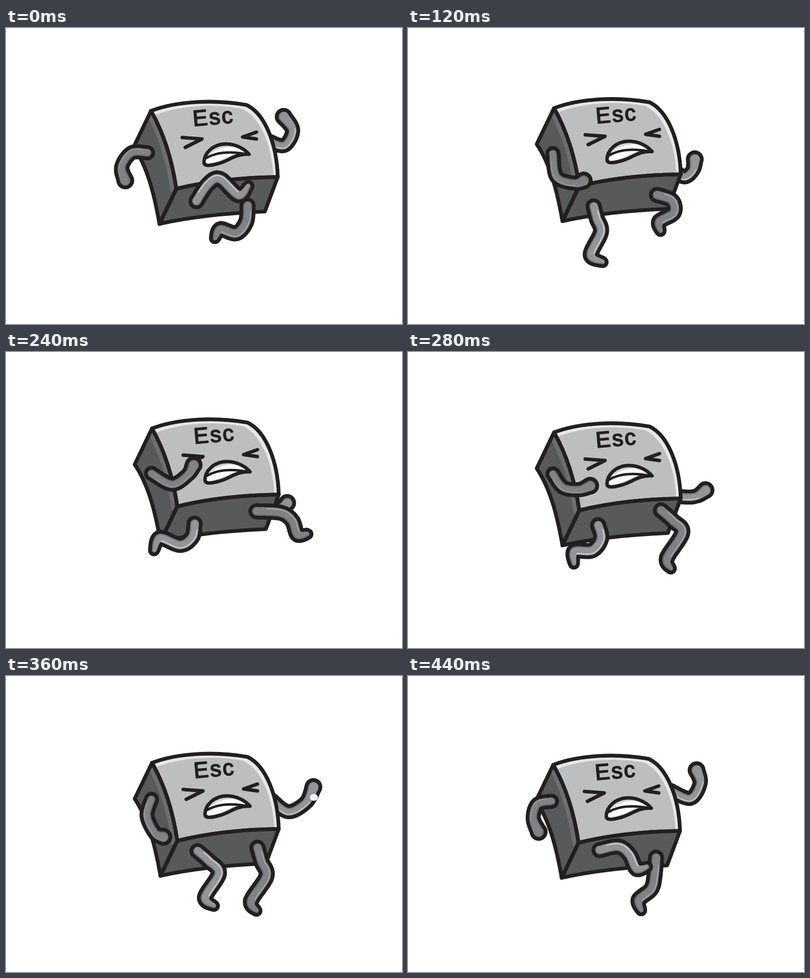
An HTML page with a canvas for the animation above (0.48 s loop, 800x600 px).

```html
<!DOCTYPE html>
<html lang="en">
<head>
<meta charset="utf-8">
<title>Running Esc key</title>
<style>
  html, body { margin: 0; width: 100%; height: 100%; overflow: hidden; background: #fff; }
  canvas { display: block; }
</style>
</head>
<body>
<canvas id="stage" width="800" height="600"></canvas>
<script>
const ctx = document.getElementById('stage').getContext('2d');
const STEPS = 12, STEP_MS = 40, INK = '#231f20', LINE = 7.6;

// Poses by step; each is a chain of x, y joints from the body outwards.
const bodyShift = {
  0: [-2, 9], 2: [0, 7], 4: [0, 0], 6: [0, -4], 7: [0, 4], 9: [0, 17], 11: [-1.5, 21]
};
const nearLeg = {
  0: [385, 351, 408, 317, 432, 306, 470, 339, 490, 320],
  2: [380, 366, 390, 387, 404, 410, 377, 455, 397, 474],
  4: [370, 357, 372, 385, 373, 415, 359, 462, 386, 471],
  6: [381, 348, 376, 375, 352, 391, 311, 377, 299, 402],
  7: [384, 351, 390, 378, 372, 402, 336, 404, 335, 429],
  9: [387, 355, 410, 375, 430, 400, 402, 449, 420, 466],
  11: [387, 353, 425, 346, 447, 362, 462, 391, 483, 387]
};
const farLeg = {
  0: [488, 360, 485, 393, 465, 416, 433, 408, 422, 426],
  2: [499, 348, 520, 366, 513, 390, 483, 395, 481, 416],
  4: [507, 329, 543, 329, 557, 350, 535, 381, 541, 397],
  6: [506, 323, 555, 326, 578, 342, 589, 370, 609, 369],
  7: [511, 321, 535, 342, 554, 366, 523, 418, 531, 439],
  9: [508, 348, 516, 376, 526, 406, 495, 456, 506, 476],
  10: [505, 361, 510, 392, 512, 424, 479, 468, 490, 491],
  11: [501, 368, 498, 405, 491, 432, 466, 454, 471, 475]
};
const leftArm = {
  0: [286, 253, 254, 253, 234, 281, 241, 309],
  2: [292, 262, 272, 295, 284, 330, 299, 342],
  4: [294, 247, 337, 284, 371, 263, 377, 245],
  6: [294, 246, 335, 268, 367, 249, 379, 229],
  7: [293, 247, 313, 274, 345, 279, 368, 271],
  9: [294, 250, 285, 283, 301, 318, 318, 326],
  11: [290, 254, 262, 260, 253, 288, 264, 316]
};
const rightArm = {
  0: [530, 229, 562, 238, 579, 208, 561, 180],
  2: [540, 276, 566, 269, 576, 243, 565, 220],
  4: [535, 302, 540, 324, 556, 321, 569, 308],
  6: [535, 300, 540, 319, 555, 316, 568, 306],
  7: [535, 290, 560, 294, 583, 292, 601, 280],
  8: [535, 269, 570, 286, 606, 274, 626, 254],
  9: [535, 250, 570, 275, 606, 256, 621, 225],
  11: [530, 232, 570, 248, 590, 218, 583, 191]
};

const LEG = { from: 16.3, to: 12 };
const ARM = { from: 15.2, to: 18 };
const mix = (a, b, u) => a + (b - a) * u;
const turn = (a, b, u) => a + Math.atan2(Math.sin(b - a), Math.cos(b - a)) * u;

function neighbours(poses, step) {
  const keys = Object.keys(poses).map(Number);
  const before = keys.filter(k => k <= step).pop();
  const after = keys.find(k => k > step) ?? STEPS;
  return [poses[before], poses[after % STEPS], (step - before) / (after - before)];
}

// Blends two chains by bone length and angle, so that joints swing in arcs.
function chainAt(poses, step) {
  const [a, b, u] = neighbours(poses, step);
  const joints = [[mix(a[0], b[0], u), mix(a[1], b[1], u)]];
  for (let i = 2; i < a.length; i += 2) {
    const [ax, ay, bx, by] = [a[i] - a[i - 2], a[i + 1] - a[i - 1], b[i] - b[i - 2], b[i + 1] - b[i - 1]];
    const angle = turn(Math.atan2(ay, ax), Math.atan2(by, bx), u);
    const length = mix(Math.hypot(ax, ay), Math.hypot(bx, by), u);
    const [x, y] = joints[joints.length - 1];
    joints.push([x + Math.cos(angle) * length, y + Math.sin(angle) * length]);
  }
  return joints;
}

// Catmull-Rom samples with unit normals and a radius that changes in the last bone.
function sample(joints, size) {
  const out = [], last = joints.length - 1, per = 28;
  for (let i = 0; i < last; i++) {
    const p = [joints[Math.max(i - 1, 0)], joints[i], joints[i + 1], joints[Math.min(i + 2, last)]];
    for (let j = 0; j <= per; j++) {
      const t = j / per;
      const at = c => 0.5 * (2 * p[1][c] + (p[2][c] - p[0][c]) * t +
        (2 * p[0][c] - 5 * p[1][c] + 4 * p[2][c] - p[3][c]) * t * t +
        (3 * p[1][c] - p[0][c] - 3 * p[2][c] + p[3][c]) * t ** 3);
      const slope = c => 0.5 * (p[2][c] - p[0][c] +
        2 * (2 * p[0][c] - 5 * p[1][c] + 4 * p[2][c] - p[3][c]) * t +
        3 * (3 * p[1][c] - p[0][c] - 3 * p[2][c] + p[3][c]) * t * t);
      const dx = slope(0), dy = slope(1), d = Math.hypot(dx, dy) || 1;
      const r = i === last - 1 ? mix(size.from, size.to, t) : size.from;
      out.push({ x: at(0), y: at(1), nx: dy / d, ny: -dx / d, r });
    }
  }
  return out;
}

function tube(points, color, inset, shift = 0) {
  ctx.fillStyle = color;
  ctx.beginPath();
  for (const p of points) {
    const x = p.x + p.nx * shift, y = p.y + p.ny * shift, r = p.r - inset;
    ctx.moveTo(x + r, y);
    ctx.arc(x, y, r, 0, Math.PI * 2);
  }
  ctx.fill();
}

function limb(poses, step, size, side, base, shade, shine) {
  const points = sample(chainAt(poses, step), size);
  tube(points, INK, 0);
  tube(points, shade, LINE);
  tube(points, base, LINE + 1.3, side * 1.3);
  ctx.beginPath();
  for (const p of points.slice(points.length * 0.12, points.length * 0.72)) {
    const d = side * (p.r - LINE) * 0.68;
    ctx.lineTo(p.x + p.nx * d, p.y + p.ny * d);
  }
  ctx.strokeStyle = shine;
  ctx.lineWidth = 2;
  ctx.stroke();
}

function fill(d, color) {
  ctx.fillStyle = color;
  ctx.fill(new Path2D(d));
}

function stroke(d, width = LINE, color = INK) {
  ctx.strokeStyle = color;
  ctx.lineWidth = width;
  ctx.stroke(new Path2D(d));
}

const topLine = 'M295 159 C350 138 425 136 488 147';
const rightLine = 'C525 165 549 225 551 293';
const ridge = 'M295 159 C318 200 337 255 346 317';
const face = `${topLine} ${rightLine} C480 294 410 301 346 317 C337 255 318 200 295 159 Z`;
const front = 'M346 317 C410 301 480 294 551 293 L525 363 C450 366 380 373 312 388 Z';
const side = 'M295 159 L260 232 C287 272 301 325 312 388 L346 317 C337 255 318 200 295 159 Z';
const mouth = 'M402 263 C402 245 420 226 447 226 C466 226 484 236 493 247 ' +
  'C465 245 450 262 430 266 C415 270 402 272 402 263 Z';

function label() {
  ctx.save();
  ctx.translate(380.5, 190);
  ctx.rotate(-0.085);
  ctx.font = '45px "Liberation Sans", Arial, sans-serif';
  ctx.letterSpacing = '3px';
  ctx.fillStyle = ctx.strokeStyle = INK;
  ctx.lineWidth = 2;
  ctx.fillText('Esc', 0, 0);
  ctx.strokeText('Esc', 0, 0);
  ctx.restore();
}

function keycap() {
  fill(side, '#58595b');
  ctx.save();
  ctx.clip(new Path2D(side));
  stroke(ridge, 24, '#6d6e71');
  ctx.restore();
  fill(front, '#58595b');
  fill(face, '#e6e7e8');
  fill('M301 168 C355 147 425 144 480 155 C515 172 540 228 542 294 ' +
    'C480 294 410 301 346 317 C337 255 318 200 301 168 Z', '#bcbec0');
  [side, front, face].forEach(d => stroke(d));
  label();
  stroke('M358 213 L398 216 L364 233', 7);
  stroke('M508 202 L480 212 L508 216', 7);

  fill(mouth, '#fff');
  ctx.save();
  ctx.clip(new Path2D(mouth));
  stroke('M406 250 C420 234 440 228 462 229', 7, '#d1d3d4');
  stroke('M408 271 C430 268 445 256 470 248', 7, '#d1d3d4');
  ctx.restore();
  stroke('M404 256 C425 243 455 240 490 247', 5);
  stroke(mouth, 7);
}

function draw(step) {
  ctx.fillStyle = '#fff';
  ctx.fillRect(0, 0, 800, 600);
  ctx.lineCap = ctx.lineJoin = 'round';

  limb(rightArm, step, ARM, -1, '#939598', '#77787b', '#c7c8ca');
  if (step === 9) {
    ctx.fillStyle = '#f4f4f6';
    ctx.beginPath();
    ctx.ellipse(622, 246, 8, 7, 0, 0, Math.PI * 2);
    ctx.fill();
  }

  const [a, b, u] = neighbours(bodyShift, step);
  ctx.save();
  ctx.translate(mix(a[0], b[0], u), mix(a[1], b[1], u));
  keycap();
  ctx.restore();

  limb(leftArm, step, ARM, -1, '#808285', '#6d6e71', '#939598');
  limb(farLeg, step, LEG, 1, '#808285', '#6d6e71', '#a7a9ac');
  limb(nearLeg, step, LEG, 1, '#939598', '#77787b', '#d1d3d4');
}

const start = performance.now();
function tick() {
  draw(Math.floor((performance.now() - start) / STEP_MS) % STEPS);
  requestAnimationFrame(tick);
}
tick();
</script>
</body>
</html>
```
